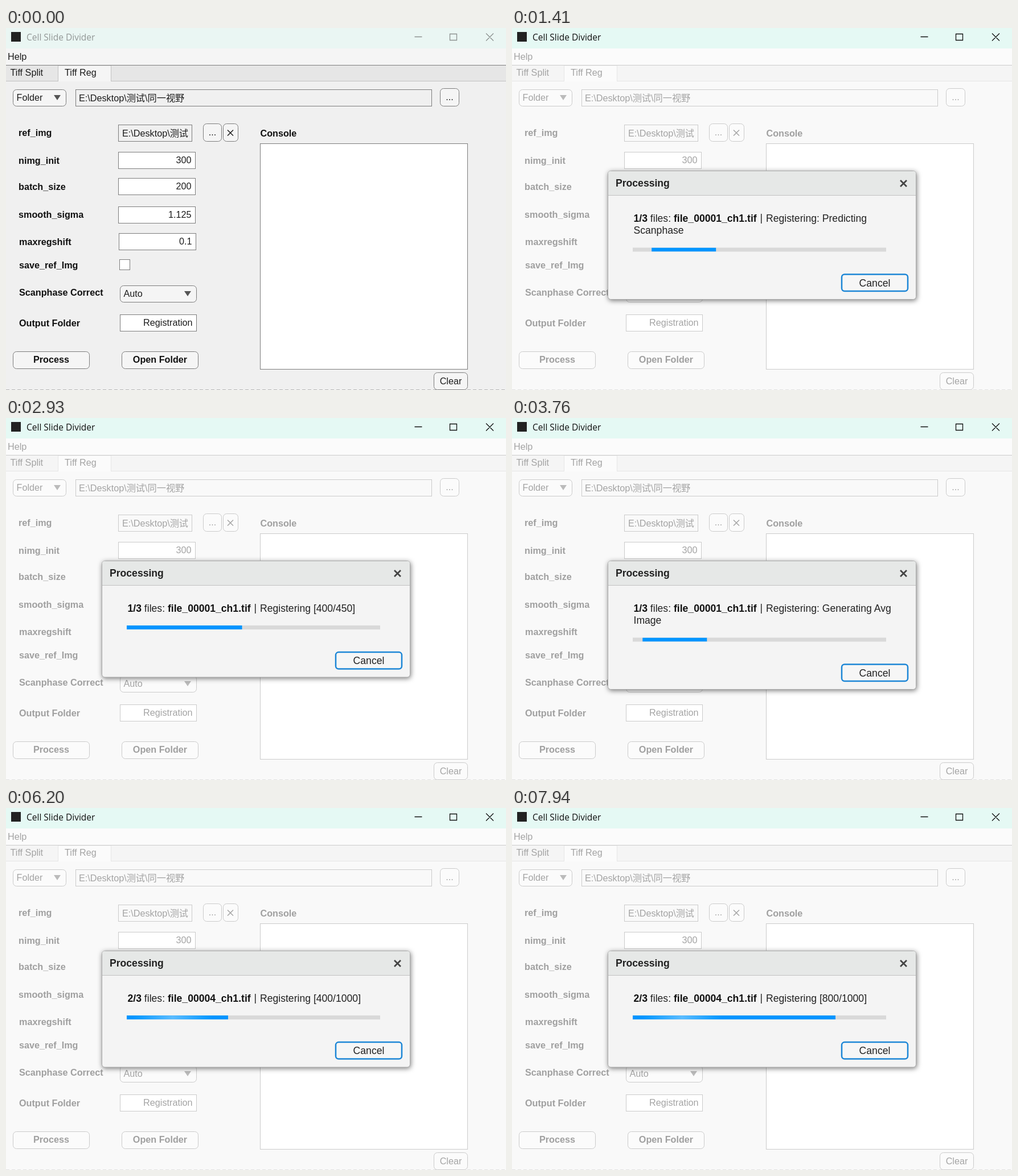
These frames come from a looping animation (878 by 637 pixels, 8000 ms). An HTML page:

```html
<!DOCTYPE html>
<html>
<head>
<meta charset="utf-8">
<style>
html, body { margin: 0; width: 100%; height: 100%; overflow: hidden; background: #f0f0f0; }
svg { display: block; width: 878px; height: 637px; }
text { font: 16.2px "Liberation Sans", "Noto Sans CJK SC", "Noto Sans CJK", sans-serif; fill: #1c1c1c; white-space: pre; }
.b { font-weight: bold; fill: #111; }
#dialog text { font-size: 17.6px; fill: #212121; }
#title { font: 15.5px "Open Sans", "Noto Sans", sans-serif; }
#card { filter: drop-shadow(1px 2px 4px rgba(0, 0, 0, .5)); }
</style>
</head>
<body>
<svg viewBox="0 0 878 637">
  <defs>
    <linearGradient id="glow">
      <stop offset="0" stop-color="#5bbcff" stop-opacity="0"/>
      <stop offset=".5" stop-color="#5bbcff"/>
      <stop offset="1" stop-color="#5bbcff" stop-opacity="0"/>
    </linearGradient>
    <clipPath id="track"><rect x="212" y="386.5" width="445" height="7"/></clipPath>
    <clipPath id="filled"><rect id="fillClip" x="212" y="386.5" height="7"/></clipPath>
  </defs>
  <rect id="titleBar" width="878" height="36"/>
  <rect x="9" y="7" width="17" height="17" fill="#222"/>
  <text id="title" x="36" y="21.5">Cell Slide Divider</text>
  <path id="controls" d="M717.5 15.5h13M779.5 10.5h12v11h-12zM843 9.5l13 13m0-13l-13 13" fill="none" stroke-width="1.3"/>
  <g id="form"></g>
  <rect id="veil" y="36" width="878" height="601" fill="#fff" opacity=".6"/>
  <g id="dialog">
    <rect id="card" x="168.5" y="251.5" width="541" rx="5" fill="#f4f4f4" stroke="#a9a9a9"/>
    <path d="M169 294V256q0-4 4-4h532q4 0 4 4v38z" fill="#e6e8e7"/>
    <path d="M169 294.5h540" stroke="#c2c2c2"/>
    <text class="b" x="182" y="279">Processing</text>
    <path d="M682 268l11 11m0-11l-11 11" stroke="#444" stroke-width="2.8"/>
    <text id="head" x="213.5" y="340.5"></text>
    <text x="435.5" y="340">|</text>
    <text id="status" x="446" y="340.5"></text>
    <text id="wrap" x="213.5" y="362"></text>
    <g id="lower">
      <rect x="212" y="386.5" width="445" height="7" fill="#d9d9d9"/>
      <g clip-path="url(#track)"><rect id="bar" y="386.5" height="7" fill="#0095ff"/></g>
      <g clip-path="url(#filled)"><rect id="sheen" y="386.5" width="140" height="7" fill="url(#glow)"/></g>
      <rect x="579" y="433.5" width="116" height="29.5" rx="5" fill="#f6f6f6" stroke="#1c86d6" stroke-width="2.5"/>
      <text x="637" y="454.5" text-anchor="middle">Cancel</text>
    </g>
  </g>
</svg>
<script>
const $ = id => document.getElementById(id);
const set = (id, attrs) => { for (const k in attrs) $(id).setAttribute(k, attrs[k]); };

// Static form
let form = '';
const box = (x, y, w, h, fill = '#fff', rx = 0, stroke = '#7d7d7d') =>
  form += `<rect x="${x + .5}" y="${y + .5}" width="${w}" height="${h}" rx="${rx}" fill="${fill}" stroke="${stroke}"/>`;
const text = (s, x, y, cls = '', anchor = 'start') =>
  form += `<text x="${x}" y="${y}" class="${cls}" text-anchor="${anchor}">${s}</text>`;
const path = (d, attrs) => form += `<path d="${d}" ${attrs}/>`;
const button = (s, x, y, w, h, cls, ty) => {
  box(x, y, w, h, '#f5f5f5', 6);
  text(s, x + w / 2 + .5, ty, cls, 'middle');
};
const dropdown = (s, x, y, w, arrowX) => {
  box(x, y, w, 29, '#f5f5f5', 6);
  text(s, x + 6.5, y + 20);
  path(`M${arrowX} ${y + 10}h12l-6 9z`, 'fill="#555"');
};
const field = (s, x, y, w) => {
  box(x, y, w, 29);
  text(s, x + w - 6.5, y + 20, '', 'end');
};

path('M0 36h878v29H0z', 'fill="#f5f5f5"');
text('Help', 3, 56);
path('M0 66h878v28H0z', 'fill="#e6e6e6"');
path('M0 93.5h878', 'stroke="#c2c2c2"');
path('M91.5 94V66h93v28', 'fill="#f5f5f5" stroke="#c2c2c2"');
path('M0 65.5h878', 'stroke="#7f7f7f"');
text('Tiff Split', 7.5, 84);
text('Tiff Reg', 103, 84);

dropdown('Folder', 12, 108, 93, 84);
box(122, 108, 625, 29, '#f0f0f0');
text('E:\\Desktop\\测试\\同一视野', 128, 128.5);
button('...', 762, 106, 33, 31, '', 127);
box(197, 170, 129, 29, '#f0f0f0');
text('E:\\Desktop\\测试', 204, 190.5);
button('...', 346, 168, 32, 31, '', 189);
button('', 381, 168, 26, 31, '', 189);
path('M389 179.5l10 10m0-10l-10 10', 'stroke="#222" stroke-width="1.6"');

[['ref_img', 22, 190], ['nimg_init', 22, 239], ['batch_size', 22, 285], ['smooth_sigma', 22, 334],
 ['maxregshift', 23, 382], ['save_ref_Img', 23, 422.5], ['Scanphase Correct', 23, 471],
 ['Output Folder', 23, 525], ['Console', 446.5, 190.5]].forEach(l => text(...l, 'b'));

field('300', 197, 218, 135);
field('200', 197, 264, 135);
field('1.125', 197, 314, 135);
field('0.1', 198, 361, 135);
box(199, 407, 18, 18);
dropdown('Auto', 200, 453, 134, 313);
field('Registration', 200, 504, 134);
button('Process', 12, 569, 134, 30, 'b', 589);
button('Open Folder', 203, 569, 134, 30, 'b', 589);
box(446, 203, 364, 397);
path('M0 636.5h878', 'stroke="#b5b5b5" stroke-dasharray="6 4"');
button('Clear', 751, 606, 59, 30, '', 627);
$('form').innerHTML = form;

// Timeline: start, file index, status, wrapped line, progress from and to (none = indeterminate)
const LOOP = 8000, FOCUS = 70, DIM = 490, OPEN = 560;
const FILES = ['file_00001_ch1.tif', 'file_00004_ch1.tif'];
const PHASES = [
  [OPEN, 0, 'Registering', ''],
  [887, 0, 'Registering: Predicting', 'Scanphase'],
  [2095, 0, 'Registering [200/450]', '', 0, 4 / 9],
  [2928, 0, 'Registering [400/450]', '', 4 / 9, 8 / 9],
  [3294, 0, 'Registering: Generating Avg', 'Image'],
  [4000, 1, 'Registering', ''],
  [4220, 1, 'Registering: Predicting', 'Scanphase'],
  [4529, 1, 'Registering [200/1000]', '', 8 / 9, .2],
  [5570, 1, 'Registering [400/1000]', '', .2, .4],
  [6400, 1, 'Registering [600/1000]', '', .4, .6],
  [7230, 1, 'Registering [800/1000]', '', .6, .8]
];
const SHEENS = [2200, 3000, 5060, 5950, 6740, 7680];
const WIDTH = 445, CHUNK = 113, SWEEP = 2000;

function drawDialog(t) {
  const [start, file, status, wrap, from, to] = PHASES.findLast(p => p[0] <= t);
  const age = t - start;
  const lift = wrap ? 0 : 21.4;
  $('head').innerHTML = `<tspan class="b">${file + 1}/3</tspan> files: <tspan class="b">${FILES[file]}</tspan>`;
  $('status').textContent = status;
  $('wrap').textContent = wrap;
  set('card', { height: 226 - lift });
  set('lower', { transform: `translate(0 ${-lift})` });

  let x = 212, width = CHUNK, filled = 0;
  if (to === undefined) {
    x += (age % SWEEP) / SWEEP * (WIDTH + CHUNK) - CHUNK;
  } else {
    const rest = 1 - Math.min(age / 250, 1);
    filled = width = WIDTH * (to + (from - to) * rest * rest);
  }
  set('bar', { x, width });
  set('fillClip', { width: filled });
  const sweep = SHEENS.findLast(s => s <= t) ?? -LOOP;
  set('sheen', { x: 72 + (t - sweep) * .6 });
}

function draw(now) {
  const t = now % LOOP;
  const active = t >= FOCUS;
  set('titleBar', { fill: active ? '#e5f9f4' : '#eaf6f3' });
  $('title').style.fill = active ? '#111' : '#929796';
  set('controls', { stroke: active ? '#111' : '#8c9190' });
  set('veil', { visibility: t >= DIM ? 'visible' : 'hidden' });
  set('dialog', { visibility: t >= OPEN ? 'visible' : 'hidden' });
  if (t >= OPEN) drawDialog(t);
  requestAnimationFrame(draw);
}
requestAnimationFrame(draw);
</script>
</body>
</html>
```
